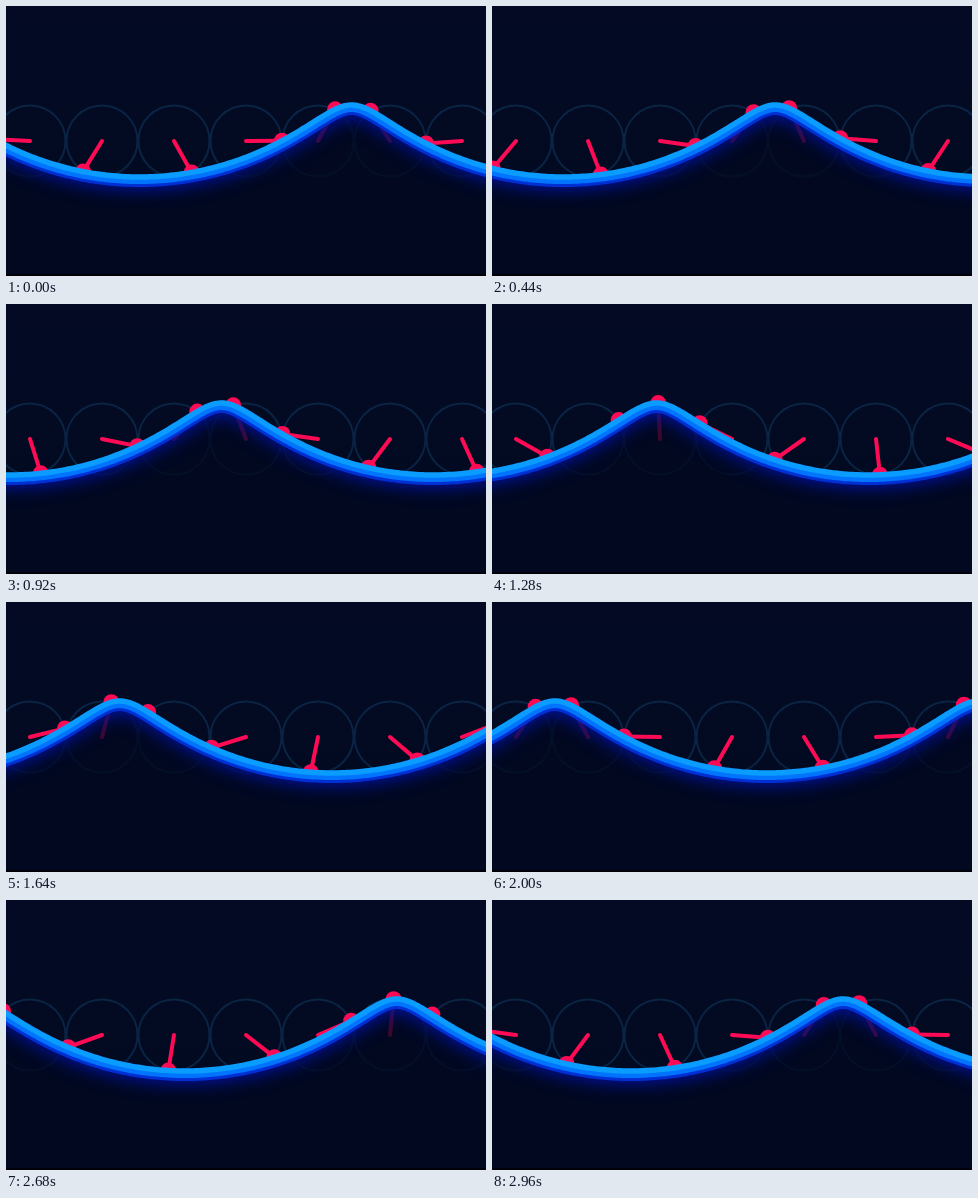
These frames come from a looping animation (480x270 px, 3000 ms). An HTML page with a canvas:

```html
<!DOCTYPE html>
<html lang="en">
<head>
<meta charset="utf-8">
<title>Trochoidal wave</title>
<style>
  html, body { margin: 0; width: 100%; height: 100%; overflow: hidden; background: #030a22; }
  canvas { display: block; width: 480px; height: 270px; }
</style>
</head>
<body>
<canvas id="stage" width="480" height="270"></canvas>
<script>
  const W = 480, H = 270;
  const LOOP = 3000, STEP = 40;
  const MID = 135, R = 36, GAP = 72, FIRST = 24;
  const LENGTH = 424, CREST = 345.5;
  const TAU = Math.PI * 2;
  const ctx = document.getElementById('stage').getContext('2d');

  const sky = ctx.createLinearGradient(0, 0, 0, H);
  sky.addColorStop(0, '#040a24');
  sky.addColorStop(1, '#010a20');

  // Position of the water particle that orbits around (x, MID)
  function particle(x, phase) {
    const a = TAU * ((x - CREST) / LENGTH + phase);
    return [x - R * Math.sin(a), MID - R * Math.cos(a)];
  }

  function surface(phase) {
    const path = new Path2D();
    for (let x = -80; x <= W + 80; x += 2) path.lineTo(...particle(x, phase));
    return path;
  }

  function disc(x, y, r) {
    ctx.beginPath();
    ctx.arc(x, y, r, 0, TAU);
  }

  function stroke(path, color, width) {
    ctx.strokeStyle = color;
    ctx.lineWidth = width;
    ctx.stroke(path);
  }

  function drawOrbits(phase) {
    ctx.lineCap = 'round';
    for (let x = FIRST - GAP; x <= W + GAP; x += GAP) {
      disc(x, MID, R - 0.5);
      ctx.strokeStyle = '#0a2444';
      ctx.lineWidth = 2;
      ctx.stroke();
    }
    ctx.strokeStyle = ctx.fillStyle = '#ff0a54';
    ctx.lineWidth = 4;
    for (let x = FIRST - GAP; x <= W + GAP; x += GAP) {
      const [px, py] = particle(x, phase);
      ctx.beginPath();
      ctx.moveTo(x, MID);
      ctx.lineTo(px, py);
      ctx.stroke();
      disc(px, py, 8);
      ctx.fill();
    }
  }

  function drawWater(phase) {
    const top = surface(phase);
    const body = new Path2D(top);
    body.lineTo(W + 120, H);
    body.lineTo(-120, H);
    body.closePath();

    ctx.save();
    ctx.clip(body);
    ctx.fillStyle = 'rgba(2, 8, 32, 0.76)';
    ctx.fillRect(0, 0, W, H);
    ctx.shadowColor = '#0014c8';
    ctx.shadowBlur = 19;
    stroke(top, '#0030d4', 20);
    ctx.shadowColor = 'transparent';
    stroke(top, '#0074fc', 14);
    ctx.restore();

    stroke(top, '#0a9cff', 5.5);
  }

  function draw(now) {
    const t = Math.floor((now % LOOP) / STEP) * STEP;
    const phase = t / LOOP;
    ctx.fillStyle = sky;
    ctx.fillRect(0, 0, W, H);
    drawOrbits(phase);
    drawWater(phase);
    ctx.fillStyle = '#000006';
    ctx.fillRect(0, H - 2, W, 2);
  }

  let start;
  function tick(now) {
    start ??= now;
    draw(now - start);
    requestAnimationFrame(tick);
  }
  draw(0);
  requestAnimationFrame(tick);
</script>
</body>
</html>
```
